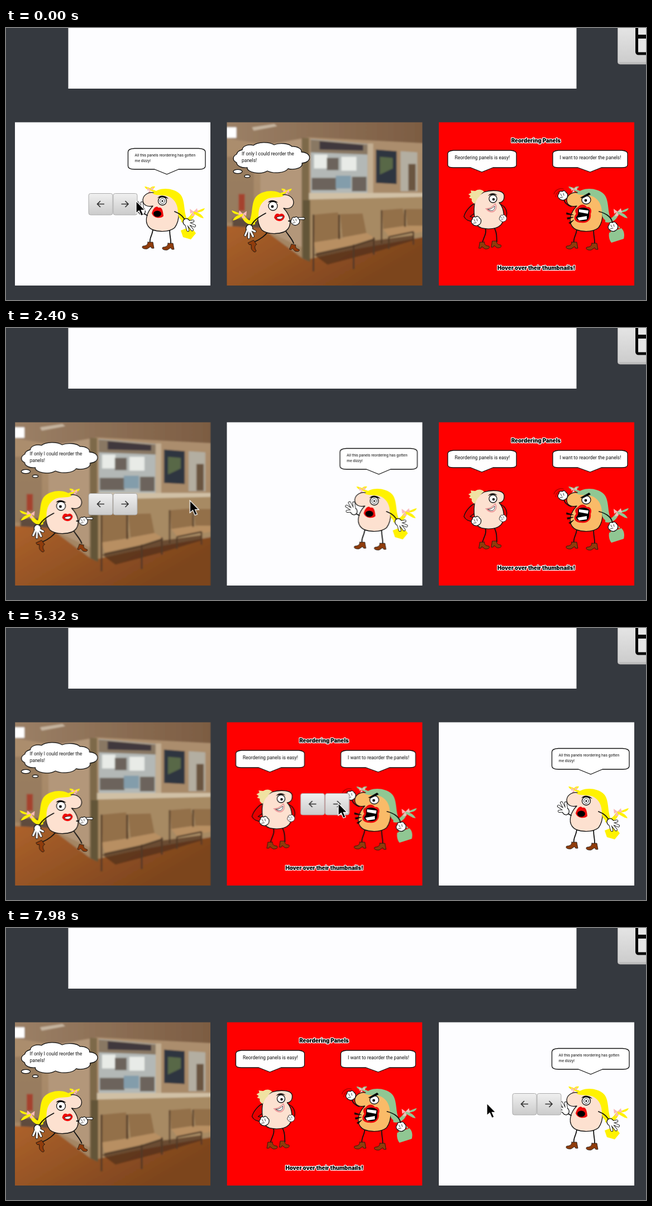
An HTML page that plays this animation: 1146x489 px, repeating every 8000 ms.

```html
<!DOCTYPE html>
<html lang="en">
<head>
<meta charset="utf-8">
<title>Reordering panels</title>
<style>
html, body { margin: 0; width: 100%; height: 100%; overflow: hidden; background: #35393f; }
svg { display: block; }
text { font: 8.5px Roboto, Arial, sans-serif; fill: #111; }
.tiny { font-size: 6.8px; }
.title { font: 900 9.7px Inter, sans-serif; text-anchor: middle; fill: #000; stroke: #fff; stroke-width: 2.6px; stroke-linejoin: round; paint-order: stroke; }

.ink { stroke: #111; stroke-width: 1.3; stroke-linejoin: round; stroke-linecap: round; }
.thin { stroke-width: .8; }
.line { fill: none; }
.white { fill: #fff; }
.skin { fill: var(--skin, #fde1d0); }
.hair { fill: var(--hair, #fff200); }
.bow { fill: #f9b9b9; }
.boot { fill: #8f3c0c; }
.limb { fill: none; stroke: #111; stroke-width: 1.8; stroke-linecap: round; }
.outer { fill: none; stroke: #111; stroke-width: 5; stroke-linecap: round; }
.inner { fill: none; stroke: #fff; stroke-width: 3.2; stroke-linecap: round; }
.lips { fill: #ee0a0a; }

.dizzy, .wish, .red, .buttons, .ring { animation: 8s step-end infinite; }
.dizzy { animation-name: dizzy; }
.wish { animation-name: wish; }
.red { animation-name: red; }
.buttons { animation-name: buttons; }
.ring { animation-name: ring; }
.cursor { animation: cursor 8s linear infinite; }

@keyframes dizzy {
  0% { transform: translateX(0); }
  24.5% { transform: translateX(379.5px); }
  63.5%, 100% { transform: translateX(759px); }
}
@keyframes wish {
  0% { transform: translateX(0); }
  24.5%, 100% { transform: translateX(-379.5px); }
}
@keyframes red {
  0% { transform: translateX(0); }
  63.5%, 100% { transform: translateX(-379.5px); }
}
@keyframes buttons {
  0% { transform: translateX(0); visibility: visible; }
  31.8% { transform: translateX(0); visibility: hidden; }
  33.2% { transform: translateX(379.5px); visibility: visible; }
  88.15% { transform: translateX(379.5px); visibility: hidden; }
  91.15%, 100% { transform: translateX(759px); visibility: visible; }
}
@keyframes ring {
  0% { opacity: 0; }
  21% { opacity: 1; }
  24.5% { opacity: 0; }
  61% { opacity: 1; }
  63.5%, 100% { opacity: 0; }
}
@keyframes cursor {
  0% { transform: translate(233px, 311px); }
  24.5% { transform: translate(234px, 311px); }
  30% { transform: translate(329px, 310px); }
  42% { transform: translate(580px, 314px); }
  47%, 52.25% { transform: translate(594px, 315px); }
  66.5%, 72% { transform: translate(595px, 315px); }
  80.25% { transform: translate(666px, 315px); }
  99.75%, 100% { transform: translate(861px, 315px); }
}
</style>
</head>
<body>
<svg width="1146" height="489" viewBox="0 0 1146 489">
<defs>
  <linearGradient id="metal" x2="0" y2="1"><stop stop-color="#f0f0f0"/><stop offset="1" stop-color="#cbcbcb"/></linearGradient>
  <linearGradient id="pressed" x2="0" y2="1"><stop stop-color="#dcdedf"/><stop offset="1" stop-color="#c3c6c8"/></linearGradient>
  <linearGradient id="ceiling" x2="1" y2="0"><stop stop-color="#9c8167"/><stop offset="1" stop-color="#7b5b41"/></linearGradient>
  <linearGradient id="wall" x2="0" y2="1"><stop stop-color="#ad8f6f"/><stop offset="1" stop-color="#a08260"/></linearGradient>
  <linearGradient id="floor" x2=".9" y2=".5"><stop stop-color="#ad622b"/><stop offset="1" stop-color="#7c441d"/></linearGradient>
  <filter id="soft" x="-5%" y="-5%" width="110%" height="110%"><feGaussianBlur stdDeviation="1.6"/></filter>
  <clipPath id="room"><path d="M395.5 169.5h350V463h-350z"/></clipPath>

  <path id="boot" class="ink thin boot" d="M-5 -2L4 -2L6 9L2 9L0 6L-6 10C-13 11 -17 8 -14 5C-9 5 -5 3 -5 -2Z"/>

  <g id="open">
    <path class="outer" d="M0 3L-10 0M0 2L-8 -9M1 1L-1 -13M3 3L6 -10"/>
    <ellipse class="ink white" cx="1" cy="4" rx="6" ry="6.5"/>
    <path class="inner" d="M0 3L-10 0M0 2L-8 -9M1 1L-1 -13M3 3L6 -10"/>
  </g>

  <g id="fist">
    <path class="ink white" d="M-7 -3C-7 -8 -3 -8 -1 -7C1 -10 5 -8 6 -5C10 -3 9 4 6 6C2 10 -4 9 -7 5C-10 3 -9 -2 -7 -3Z"/>
    <path class="ink thin line" d="M-4 -3L-2 1M1 -4L2 0M-5 4L0 3"/>
  </g>

  <path id="bow" class="bow" d="M0 0L-7 -5L-6 4ZM0 0L6 -6L8 2ZM-1 0L-5 9L2 7Z"/>

  <!-- head with pigtails, facing left -->
  <g id="head">
    <path class="hair" d="M314 341C329 346 329 335 337 329C344 330 349 325 356 324C354 330 347 331 342 332C347 333 352 337 354 342C346 341 342 336 338 335C334 346 324 352 314 349Z"/>
    <path class="hair" d="M268 299C265 294 260 294 257 291C253 291 250 289 248 285C252 285 256 287 258 288C260 285 264 284 267 285C266 288 262 290 262 291C267 291 271 294 273 297Z"/>
    <use href="#bow" x="336" y="330"/>
    <use href="#bow" transform="translate(258 290) scale(.75)"/>
    <path class="ink skin" d="M269 298C258 292 246 299 245 309C245 319 254 322 263 320C253 330 247 346 255 357C263 368 292 368 302 359C312 346 312 318 302 305C294 296 280 294 269 298Z"/>
    <path class="hair" d="M263 298C272 286 299 286 312 299C322 311 317 331 325 345C317 350 309 345 308 333C308 320 304 309 292 303C282 299 272 302 263 298Z"/>
  </g>

  <g id="legs">
    <path class="limb" d="M263 361C263 372 256 377 258 387M294 357C291 369 296 378 295 389"/>
    <use href="#boot" x="259" y="387"/><use href="#boot" x="295" y="389"/>
  </g>
</defs>

<path fill="#35393f" d="M0 0h1146v489H0z"/>
<path fill="#fdfdff" d="M111.500 0h910v109h-910z"/>
<g>
  <rect x="1095.500" y="-30" width="90" height="95" rx="4" fill="url(#metal)" stroke="#aaa"/>
  <path d="M1098 62.500h48" stroke="#b8b8b8" stroke-width="2"/>
  <rect x="1129.500" y="-20" width="40" height="66" rx="3" fill="#e6e6e6" stroke="#080808" stroke-width="5"/>
  <path d="M1129 15.500h17" stroke="#080808" stroke-width="7"/>
</g>

<g class="wish">
  <g clip-path="url(#room)">
    <g filter="url(#soft)" transform="translate(395.5 169.5)">
      <path fill="url(#wall)" d="M-9 -9h370v315H-9z"/>
      <path fill="url(#ceiling)" d="M-9 -9H360V38L145 27L75 40L-9 28Z"/>
      <path fill="#b3977a" d="M60 42L145 28V230L60 190Z"/>
      <path fill="#fff" d="M-9 9H17V28H-9Z"/>
      <path fill="#c5b49f" d="M45 9L85 3L90 7L48 15Z"/>
      <path fill="#80664e" d="M0 62H48V180H0Z" opacity=".4"/>
      <path fill="#a5432f" d="M21 129h11v30H21z"/>
      <path fill="#5f4c3e" d="M10 173h50v18H10z"/>
      <path fill="url(#floor)" d="M-9 186L62 190L136 245L360 205V306H-9Z"/>
      <path fill="#a78a63" d="M143 132H360V203L300 212L147 246Z"/>
      <path fill="#b3b8b6" d="M150 30L252 39V129H150Z"/>
      <path fill="#897863" d="M150 31L252 40V58L150 54Z"/>
      <path fill="#41383e" d="M166 34L244 41V51L166 49Z"/>
      <path fill="#e8ebe7" d="M156 58h24v25h-24zM205 62h27v25h-27z"/>
      <path fill="#6c645b" d="M179 64h21v22h-21zM152 100h44v22h-44zM224 98h26v26h-26z"/>
      <path fill="#839dab" d="M195 96h27v23h-27z"/>
      <path fill="#c2ae92" d="M252 38h10v91h-10z"/>
      <path fill="#2e3640" d="M267 49L304 52V111L267 109Z"/>
      <path fill="#596747" d="M274 62L297 64V83L274 94Z"/>
      <path fill="#b3aea1" d="M311 52L341 54V124H311Z"/>
      <path fill="#6a543f" d="M325 75h13v48h-13z"/>
      <path fill="#d0c0a5" d="M137 127H360V134L140 139Z"/>
      <path fill="#7d6949" d="M134 28H147V250L134 244Z"/>
      <path fill="#635437" d="M136 140H149V251L136 245Z"/>
      <path fill="#4a2c18" d="M156 238L260 213L335 203V212L270 232L180 256Z" opacity=".65"/>
      <path fill="#93704a" d="M156 166L199 162L204 208L157 216ZM203 165L243 164L250 200L207 207Z"/>
      <path fill="#b88f62" d="M155 216L216 207L229 220L161 235ZM208 207L250 199L265 208L229 219Z"/>
      <path fill="none" stroke="#4f3926" stroke-width="3" d="M155 166V268M227 220V264M201 166V210M263 207V238M160 237L228 222L265 210"/>
      <path fill="#93704a" d="M278 158L315 155L321 186L280 192ZM320 156H360V186H323Z"/>
      <path fill="#b88f62" d="M280 192L321 186L334 195L290 205ZM323 186H360V195L338 199Z"/>
      <path fill="none" stroke="#4f3926" stroke-width="2.500" d="M277 158V218M290 206V228M334 197V220M319 157V188M290 206L334 197"/>
    </g>
  </g>
  <path class="ink white" d="M423 219A14 9 0 0 1 443 211A22 10 0 0 1 480 210A20 9 0 0 1 512 213A16 9 0 0 1 529 223A14 10 0 0 1 530 243A18 9 0 0 1 505 253A22 10 0 0 1 468 257A20 9 0 0 1 432 251A16 9 0 0 1 413 242A13 9 0 0 1 413 227A12 9 0 0 1 423 219Z"/>
  <ellipse class="ink white" cx="415" cy="258" rx="8" ry="3.600"/>
  <ellipse class="ink white" cx="432" cy="266.500" rx="5" ry="2.400"/>
  <text x="422" y="229">If only I could reorder the</text>
  <text x="422" y="240.500">panels!</text>

  <path class="limb" d="M472 358C470 372 451 382 444 385M496 356C502 370 511 376 515 387"/>
  <use href="#boot" transform="translate(444 386) rotate(55) scale(-1 1)"/>
  <use href="#boot" transform="translate(514 391) scale(-.85 .9) rotate(-12)"/>
  <use href="#head" transform="translate(760 4) scale(-1 1)"/>
  <path class="limb" d="M465 333C452 340 441 347 437 360M506 347L512 347"/>
  <use href="#open" transform="translate(436 364) rotate(190)"/>
  <path class="outer" d="M520 342.500H533"/><path class="inner" d="M520 342.500H533"/>
  <use href="#fist" transform="translate(518 347) scale(.9)"/>
  <ellipse class="ink white" cx="478" cy="320" rx="8" ry="8"/>
  <circle cx="477" cy="321" r="2.400"/>
  <path d="M469 314C473 307 483 310 487 314C480 313 474 312 469 314Z"/>
  <path class="lips" d="M480 341C482 332 487 333 490 335C494 332 498 335 499 339C497 349 485 350 480 341Z"/>
  <path class="ink thin white" d="M484 341C488 338 492 339 496 338C496 344 488 346 484 341Z"/>
</g>

<g class="red">
  <path fill="#f00" d="M775 169.500h350V463H775z"/>
  <text class="title" x="949" y="205.500">Reordering Panels</text>
  <text class="title" x="949.500" y="435">Hover over their thumbnails!</text>
  <path class="ink white" d="M801 220H904Q914 221 914 226V246Q914 251 904 251H872L852 259L832 251H801Q791 251 791 246V226Q791 221 801 220Z"/>
  <text x="803.500" y="235.500">Reordering panels is easy!</text>
  <path class="ink white" d="M989 220H1103Q1113 221 1113 226V246Q1113 251 1103 251H1066L1046 259L1024 251H989Q979 251 979 246V226Q979 221 989 220Z"/>
  <text x="991.500" y="235.500">I want to reaorder the panels!</text>

  <g>
    <path class="limb" d="M858 359C862 370 854 377 853 387M874 359C880 368 878 376 879 384"/>
    <use href="#boot" transform="translate(852 387) scale(-.9 1)"/>
    <use href="#boot" transform="translate(874 385) scale(-.85 1)"/>
    <path class="ink" fill="#e80000" d="M843 314C832 317 822 330 820 339C824 347 832 348 838 348L841 342L831 339L846 328ZM885 317C896 321 899 332 895 342L888 342L889 333Z"/>
    <path class="ink skin" d="M856 295C868 291 893 290 892 303C892 311 887 314 883 314C893 325 894 345 886 354C876 364 850 363 843 354C836 338 836 310 846 301Z"/>
    <path fill="#f0e2a2" d="M828 299L833 296L832 292L840 293C846 289 852 290 856 294C853 297 849 299 848 303C843 306 842 312 839 316C835 314 833 311 834 307L829 305L832 302Z"/>
    <use href="#fist" x="842" y="347"/>
    <use href="#fist" transform="translate(890 342) scale(.75)"/>
    <ellipse class="ink white" cx="872" cy="307" rx="7" ry="7"/>
    <circle cx="873" cy="308" r="2.200"/>
    <path d="M863 302C868 295 876 297 880 301C874 299 869 299 863 302Z"/>
    <path fill="#fff" stroke="#ee9b9b" stroke-width="2" d="M860 325C866 325 872 321 876 316C882 327 870 337 860 325Z"/>
    <path class="ink thin white" d="M863 326C869 326 873 322 875 320C876 328 869 331 863 326Z"/>
  </g>

  <g transform="translate(759)" style="--skin:#fabb68;--hair:#90c793">
    <use href="#legs"/><use href="#head"/>
    <path class="hair" d="M321 368L343 360C348 365 349 372 347 379L325 386C321 381 320 374 321 368Z"/>
    <path fill="none" stroke="#90c793" stroke-width="2" d="M325 368C323 357 335 352 340 360"/>
    <path class="limb" d="M303 330C315 333 326 340 327 351M253 321C246 319 240 313 240 307"/>
    <use href="#fist" x="328" y="357"/>
    <use href="#fist" x="238" y="301"/>
    <path fill="none" stroke="#a00" stroke-width="1.200" d="M222 299C224 291 232 287 240 290M225 304C226 296 231 293 236 292"/>
    <ellipse class="ink white" cx="280" cy="309" rx="8" ry="7.500"/>
    <circle cx="279" cy="310" r="2.400"/>
    <path d="M269 305L285 296L288 299L274 306Z"/>
    <path class="ink thin" d="M245 332L257 336L245 335ZM246 341L257 340L247 344ZM249 350L258 345L251 352Z"/>
    <path class="lips" d="M264 323C270 315 278 317 281 322C288 320 291 328 288 334C290 345 281 352 271 350C258 350 256 340 262 334C259 329 260 324 264 323Z"/>
    <path d="M266 325C274 321 283 324 286 328C284 336 287 342 281 346C273 349 262 347 262 340C268 335 264 329 266 325Z"/>
    <path fill="#fff" d="M267 326L284 328L283 334L267 331ZM264 341L281 338L281 344L267 346Z"/>
  </g>
</g>

<g class="dizzy">
  <path fill="#fdfdff" d="M16 169.500h350V463H16z"/>
  <path class="ink white" d="M230 216.500H345Q357 217 357 223V248Q357 254 346 254H309L288 263L266 254H230Q218.500 254 218.500 248V223Q218.500 217 230 216.500Z"/>
  <text class="tiny" x="230.500" y="230.500">All this panels reordering has gotten</text>
  <text class="tiny" x="230.500" y="240.500">me dizzy!</text>
  <use href="#legs"/><use href="#head"/>
  <path class="hair" d="M313 364L331 357L340 369L331 380L317 376Z"/>
  <path class="limb" d="M302 330C313 334 319 340 322 349M253 337L246 333"/>
  <use href="#open" transform="translate(326 352) rotate(150)"/>
  <use href="#open" transform="translate(241 326) rotate(-20)"/>
  <circle class="ink white" cx="280" cy="311" r="7.500"/>
  <circle class="ink thin line" cx="280" cy="311" r="4.400"/>
  <circle cx="280" cy="311" r="1.600"/>
  <path d="M271 306C276 299 286 301 291 307C284 304 277 303 271 306Z"/>
  <path class="lips" d="M261 333C264 322 270 319 273 323C280 321 281 329 282 338C278 343 264 343 261 333Z"/>
  <ellipse cx="271" cy="334" rx="7" ry="5.500"/>
</g>

<g class="buttons">
  <rect x="148" y="297.500" width="43" height="38.500" rx="3.500" fill="url(#metal)" stroke="#aaa"/>
  <rect x="192" y="297.500" width="43" height="38.500" rx="3.500" fill="url(#metal)" stroke="#aaa"/>
  <rect class="ring" x="192" y="297.500" width="43" height="38.500" rx="3.500" fill="url(#pressed)" stroke="#1593bd" stroke-width="2"/>
  <path fill="none" stroke="#333" stroke-width="1.700" d="M176 316.500H163.500M169 311L163.500 316.500L169 322M206.500 316.500H219M213.500 311L219 316.500L213.500 322"/>
</g>

<path class="cursor" fill="#000" stroke="#fff" stroke-width="1.300" d="M0 0V22L5.200 17.500L9 26.500L13 24.800L9.300 16.500H16Z"/>
</svg>
</body>
</html>
```
